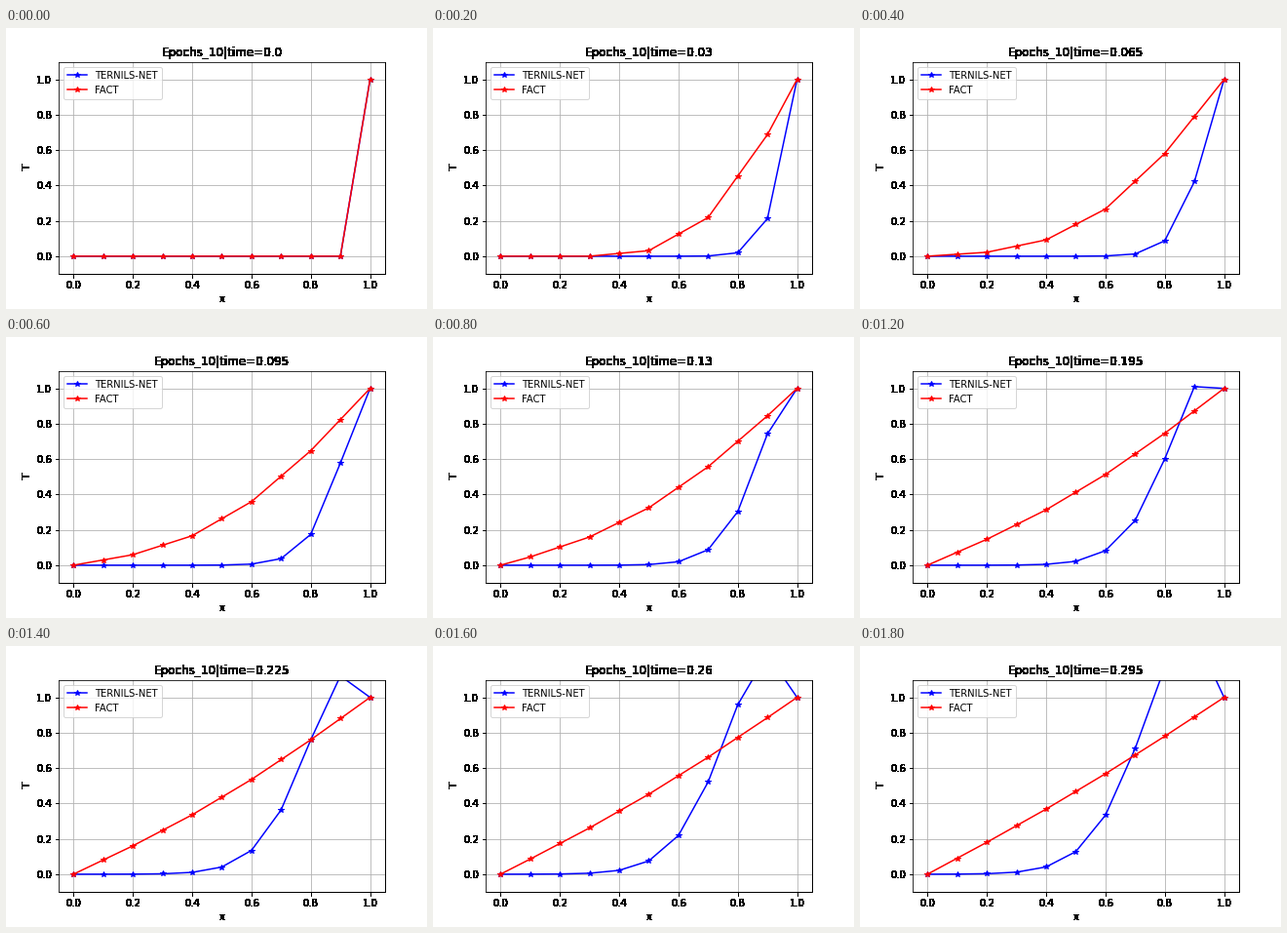
A matplotlib script for the animation above (2000 ms loop, 432 by 288 pixels).

```python
import numpy as np
import matplotlib.pyplot as plt
from matplotlib.animation import FuncAnimation

FRAMES = 10
LAST_STEP = 59
DT, DX = 0.005, 0.1
R = DT / DX**2

x = np.linspace(0, 1, 11)


def start():
    u = np.zeros(11)
    u[-1] = 1
    return u


def heat(steps):
    """Explicit scheme for the heat equation, hot right end."""
    u = start()
    for _ in range(steps):
        u[1:-1] += R * (u[2:] - 2 * u[1:-1] + u[:-2])
    return u


def predict(steps):
    """Front creeping left: node k from the hot end grows like a power of time."""
    u = start()
    if steps:
        s = np.log(steps / 39)
        scale = 1.01
        for k in range(1, 10):
            u[10 - k] = scale * np.exp((0.91 * k - 0.17) * s - 0.05 * k * s**2)
            scale /= 0.98 + 0.7 * k
    return u


def solid(image, dpi):
    """Turn every touched pixel fully black."""
    image = image.copy()
    image[..., :3] = 0
    image[..., 3] = image[..., 3] > 0
    return image, 0, 0


plt.rcParams.update({"font.family": "DejaVu Sans", "font.size": 10})
fig, ax = plt.subplots(figsize=(6, 4), dpi=72, facecolor="white")
fig.subplots_adjust(left=0.125, right=0.9, bottom=0.125, top=0.88)

net_line, = ax.plot(x, predict(0), "b-*", label="TERNILS-NET")
fact_line, = ax.plot(x, heat(0), "r-*", label="FACT")
ax.set(xlim=(-0.05, 1.05), ylim=(-0.1, 1.1), xlabel="x", ylabel="T")
ax.set_xticks(np.linspace(0, 1, 6))
ax.set_yticks(np.linspace(0, 1, 6))
ax.grid()
ax.legend(loc="upper left")
title = ax.set_title("")

# Everything outside the plot area has hard, unsmoothed edges
outside = [title, ax.spines["right"], ax.spines["bottom"]]
for axis in (ax.xaxis, ax.yaxis):
    outside.append(axis.label)
    for tick in axis.get_major_ticks():
        outside += [tick.label1, tick.tick1line]
for artist in outside:
    artist.set_agg_filter(solid)


def update(frame):
    steps = frame * LAST_STEP // (FRAMES - 1)
    net_line.set_ydata(predict(steps))
    fact_line.set_ydata(heat(steps))
    title.set_text(f"Epochs_10|time={round(steps * DT, 3)}")
    return net_line, fact_line, title


anim = FuncAnimation(fig, update, frames=FRAMES, interval=200,
                     repeat=True, repeat_delay=0, blit=False)
plt.show()
```
